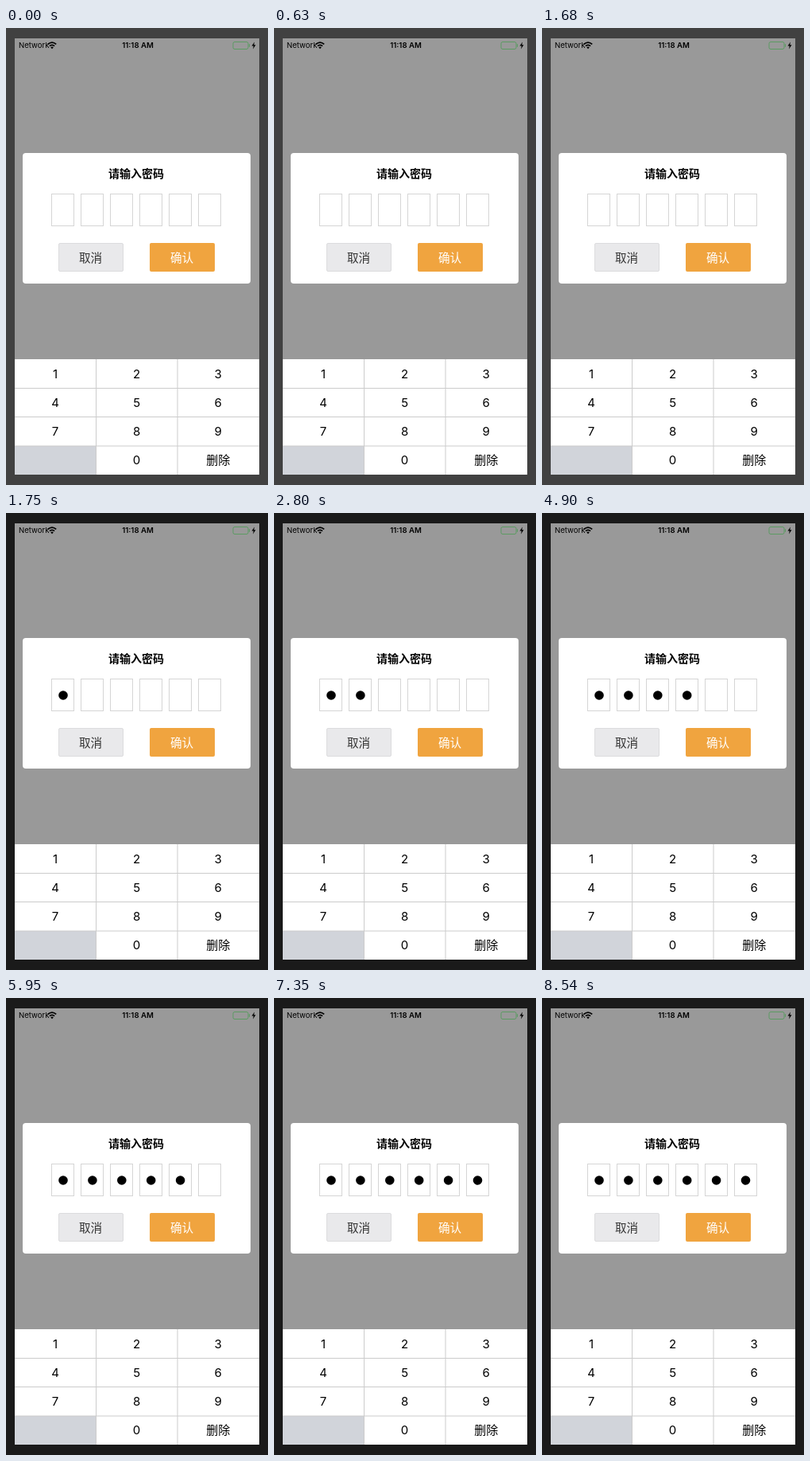
Write an HTML page that moves like this. It is 330 px wide and 574 px high and loops after 8.61 s.

```html
<!DOCTYPE html>
<html lang="zh">
<head>
<meta charset="utf-8">
<title>密码输入</title>
<style>
  html, body { margin: 0; width: 100%; height: 100%; overflow: hidden; }
  svg { display: block; width: 330px; height: 574px; }
  text { font-family: Inter, "Noto Sans CJK SC", "Noto Sans CJK", sans-serif; text-anchor: middle; }
  .status { font-size: 9.6px; }
  .title { font-size: 14px; font-weight: 700; }
  .label { font-size: 14.6px; }
  .key { font-size: 15px; }
</style>
</head>
<body>
<svg id="stage" viewBox="0 0 330 574">
  <rect id="bezel" width="330" height="574"/>
  <rect x="11" y="13" width="308" height="548" fill="#999"/>

  <text class="status" x="16" y="25" style="text-anchor:start">Network</text>
  <g fill="none" stroke="#000" stroke-width="1.7">
    <path d="M52.8 20.4Q58 15.8 63.2 20.4"/>
    <path d="M54.9 22.7Q58 19.9 61.1 22.7"/>
  </g>
  <path d="M56.2 24.2Q58 22.8 59.8 24.2L58 26.2Z"/>
  <text class="status" x="166" y="25" font-weight="600">11:18 AM</text>
  <rect x="286" y="17.5" width="19" height="9" rx="2" fill="none" stroke="#5b9b62"/>
  <path d="M306.5 20.2v3.6" stroke="#5b9b62"/>
  <path d="M313 17.5L309.5 22.6H311.8L311 26.5L314.5 21.2H312.2Z"/>

  <rect x="21" y="157" width="287" height="164" rx="4" fill="#fff"/>
  <text class="title" x="164" y="187.5">请输入密码</text>
  <g id="cells" fill="#fff" stroke="#d5d5d5"></g>
  <g id="dots"></g>
  <rect x="66.5" y="270.5" width="81" height="35" rx="1.5" fill="#e9e9eb" stroke="#dcdcde"/>
  <text class="label" x="106.5" y="293.5" fill="#333">取消</text>
  <rect x="181" y="270" width="82" height="36" rx="2" fill="#f0a43f"/>
  <text class="label" x="221.5" y="293.5" fill="#fff">确认</text>

  <rect x="11" y="416" width="308" height="145" fill="#fff"/>
  <rect x="11" y="525" width="102" height="36" fill="#d1d4da"/>
  <path d="M11 452.5H319M11 488.5H319M11 525H319M113.5 416V561M216 416V561" stroke="#ccc"/>
  <g id="keys"></g>
</svg>
<script>
const LOOP = 8610;
const DARKEN_AT = 1750;
const TAPS = [1750, 2730, 3780, 4830, 5740, 6860];
const byId = id => document.getElementById(id);

function add(parent, tag, attributes, content = "") {
  const node = document.createElementNS("http://www.w3.org/2000/svg", tag);
  for (const name in attributes) node.setAttribute(name, attributes[name]);
  node.textContent = content;
  byId(parent).append(node);
  return node;
}

const dots = TAPS.map((_, i) => {
  const center = 72 + 36.9 * i;
  add("cells", "rect", { x: Math.round(center - 14) - 0.5, y: 208.5, width: 28, height: 40 });
  return add("dots", "circle", { cx: center, cy: 229, r: 5.8 });
});

["1", "2", "3", "4", "5", "6", "7", "8", "9", "", "0", "删除"].forEach((label, i) => {
  const y = 439.5 + 36.3 * Math.floor(i / 3);
  add("keys", "text", { class: "key", x: 62 + 102.6 * (i % 3), y }, label);
});

function draw(now) {
  const time = now % LOOP;
  byId("bezel").setAttribute("fill", time < DARKEN_AT ? "#414141" : "#1a1a1a");
  dots.forEach((dot, i) => dot.setAttribute("visibility", time < TAPS[i] ? "hidden" : "visible"));
}

const start = performance.now();
function tick() {
  draw(performance.now() - start);
  requestAnimationFrame(tick);
}
tick();
</script>
</body>
</html>
```
